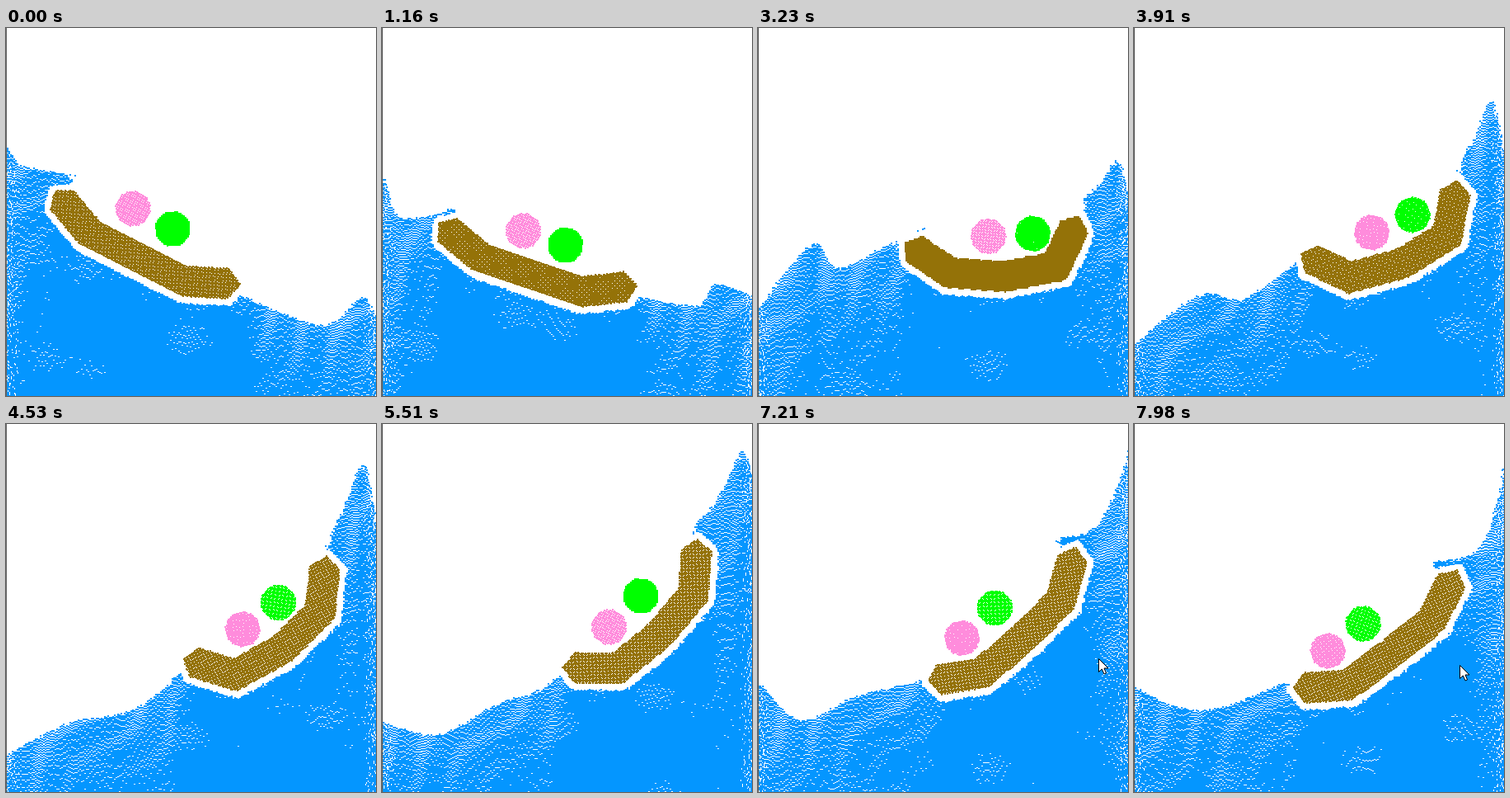
Write an HTML page with a canvas that moves like this. It is 449 px wide and 446 px high and loops after 8000 ms.

```html
<!DOCTYPE html>
<html lang="en">
<head>
<meta charset="utf-8">
<title>Boat in a wave tank</title>
<style>
  html, body { margin: 0; width: 100%; height: 100%; overflow: hidden; background: #fff; }
  canvas { display: block; }
</style>
</head>
<body>
<canvas id="stage" width="449" height="446"></canvas>
<script>
const W = 449, H = 446, LOOP = 8000, FIRST = 60, STEP = 81.65;
const ctx = document.getElementById('stage').getContext('2d');
const image = ctx.createImageData(W, H);
const pixels = new Uint32Array(image.data.buffer);
const maskCanvas = document.createElement('canvas');
maskCanvas.width = W;
maskCanvas.height = H;
const mask = maskCanvas.getContext('2d', { willReadFrequently: true });

const rgb = (r, g, b) => (0xff000000 | b << 16 | g << 8 | r) >>> 0;
const WATER = rgb(4, 150, 255), WOOD = rgb(148, 114, 8), PINK = rgb(255, 140, 220);
const GREEN = rgb(0, 255, 0), WALL = rgb(100, 100, 100), WHITE = rgb(255, 255, 255);

// boat: middle x, y, tilt, left bend, right bend (degrees)
// balls: position along the deck, height above the middle
// left: wall height, crest x, y, trough x, y, shoulder height against the bow
// right: lip offset x, y, slope x, y, crest x, y, wall height
const poses = [];
const pose = (time, boat, balls, left, right) => poses.push({ time, values: [...boat, ...balls, ...left, ...right] });

pose(0, [160, 278, 27, 23, 24], [-5, 50], [138, 8, 156, 17, 166, -27], [5, 16, 385, 360, 431, 326, 350]);
pose(1160, [182, 299, 18.7, 21, 25], [0, 47], [168, 8, 200, 19, 227, -6], [7, 15, 383, 336, 404, 310, 325]);
pose(2240, [225, 306, 10, 24, 26], [4, 43], [285, 15, 203, 52, 268, 2], [7, 4, 396, 277, 437, 280, 300]);
pose(3230, [300, 301, -4, 30, 54], [11, 50], [340, 66, 264, 98, 292, 4], [2, -19, 415, 186, 437, 157, 200]);
pose(4530, [336, 272, -37, 46, 39], [2, 48], [401, 78, 362, 145, 350, 35], [-3, -10, 410, 100, 434, 47, 120]);
pose(6430, [330, 248, -45.5, 32, 33], [-22, 51], [314, 55, 371, 128, 322, 9], [-20, -10, 405, 103, 440, 40, 30]);
pose(7980, [312, 278, -37.5, 32, 24], [-32, 49], [318, 50, 342, 105, 344, -3], [-36, -10, 415, 154, 440, 95, 30]);

function slope(k, n) {
  const a = poses[Math.max(0, k - 1)], b = poses[Math.min(poses.length - 1, k + 1)];
  return (b.values[n] - a.values[n]) / (b.time - a.time);
}

// Cubic Hermite blend between neighbouring poses.
function poseAt(time) {
  let k = 0;
  while (k < poses.length - 2 && time >= poses[k + 1].time) k++;
  const a = poses[k], b = poses[k + 1], span = b.time - a.time;
  const u = Math.min(1, (time - a.time) / span), v = 1 - u;
  return a.values.map((from, n) =>
    from * (1 + 2 * u) * v * v + b.values[n] * u * u * (3 - 2 * u) +
    span * u * v * (slope(k, n) * v - slope(k + 1, n) * u));
}

const hash = (a, b) => {
  const s = Math.sin(a * 12.9898 + b * 78.233) * 43758.5453;
  return s - Math.floor(s);
};
const move = ([x, y], angle, length) => [x + Math.cos(angle) * length, y + Math.sin(angle) * length];

// A flexible beam of four segments with pointed ends.
function bendBoat(x, y, tilt, leftBend, rightBend) {
  const rad = Math.PI / 180, half = 18.5, up = Math.PI / 2;
  const sag = 0.43 * Math.max(0, leftBend + rightBend - 48);
  const a1 = (tilt + sag / 2) * rad, a2 = (tilt - sag / 2) * rad;
  const a0 = a1 + leftBend * rad, a3 = a2 - rightBend * rad;
  const middle = [x, y], p1 = move(middle, a1, -66), p3 = move(middle, a2, 64);
  const spine = [move(p1, a0, -52), p1, middle, p3, move(p3, a3, 53)];
  const angles = [a0, a0, a1, a2, a3, a3];
  const side = way => spine.map((p, i) => {
    const before = angles[i], after = angles[i + 1];
    return move(p, (before + after) / 2 + up * way, half / Math.cos((after - before) / 2));
  });
  const bow = move(spine[0], a0, -14), stern = move(spine[4], a3, 15);
  const hull = new Path2D();
  [bow, ...side(-1), stern, ...side(1).reverse()].forEach(p => hull.lineTo(...p));
  hull.closePath();
  return { hull, spine, bow, stern, middle, tilt: tilt * rad };
}

// Adds a smooth curve through the points.
function curve(path, points) {
  path.lineTo(...points[0]);
  for (let i = 1; i < points.length; i++) {
    const p = points[i - 1], q = points[i];
    const before = points[i - 2] || p, after = points[i + 1] || q;
    path.bezierCurveTo(
      p[0] + (q[0] - before[0]) / 6, p[1] + (q[1] - before[1]) / 6,
      q[0] - (after[0] - p[0]) / 6, q[1] - (after[1] - p[1]) / 6, ...q);
  }
}

function plot(x, y, color) {
  x = Math.round(x);
  y = Math.round(y);
  for (let j = y; j < y + 2; j++)
    for (let i = x; i < x + 2; i++)
      if (i > 0 && i < W && j >= 0 && j < H) pixels[j * W + i] = color;
}

// Fills a shape with a turned lattice of 2px particles.
function lattice([cx, cy], reach, angle, gap, color, inside) {
  const c = Math.cos(angle) * gap, s = Math.sin(angle) * gap, n = Math.ceil(reach / gap);
  for (let i = -n; i <= n; i++) {
    for (let j = -n; j <= n; j++) {
      const x = cx + i * c - j * s, y = cy + i * s + j * c;
      if (inside(x, y)) plot(x - 1, y - 1, color);
    }
  }
}

function ball(boat, along, height, gap, color) {
  const center = move(move(boat.middle, boat.tilt, along), boat.tilt - Math.PI / 2, height);
  lattice(center, 22, boat.tilt + along / 21, gap, color,
    (x, y) => Math.hypot(x - center[0], y - center[1]) < 21.2);
}

function waterMask(boat, left, right) {
  const [bx, by] = boat.bow, [sx, sy] = boat.stern;
  const [leftWall, crestX, crestY, troughX, troughY, shoulder] = left;
  const [lipX, lipY, slopeX, slopeY, peakX, peakY, rightWall] = right;
  const path = new Path2D();
  curve(path, [[0, leftWall], [crestX, crestY], [troughX, troughY], [bx - 23, by + shoulder], [bx + 26, by - 20]]);
  boat.spine.forEach(p => path.lineTo(...p));
  curve(path, [[sx + lipX, sy + lipY], [slopeX, slopeY], [peakX, peakY], [W, rightWall]]);
  path.lineTo(W, H);
  path.lineTo(0, H);

  mask.globalCompositeOperation = 'source-over';
  mask.clearRect(0, 0, W, H);
  mask.fill(path);
  mask.globalCompositeOperation = 'destination-out';
  mask.lineWidth = 16;
  mask.lineJoin = 'round';
  mask.fill(boat.hull);
  mask.stroke(boat.hull);
  const data = mask.getImageData(0, 0, W, H).data;
  return (x, y) => {
    x = Math.min(W - 1, Math.max(0, Math.round(x)));
    y = Math.min(H - 1, Math.max(0, Math.round(y)));
    return data[(y * W + x) * 4 + 3] > 127;
  };
}

function smoothTops(inside) {
  const tops = Array.from({ length: W }, (_, x) => {
    let y = 0;
    while (y < H - 1 && !inside(x, y)) y++;
    return y;
  });
  return tops.map((_, x) => {
    const near = tops.slice(Math.max(0, x - 12), x + 13);
    return near.reduce((sum, y) => sum + y, 0) / near.length;
  });
}

// Rows of particles follow the surface; they spread where it is steep and stay packed under the boat.
function water(inside, boat, time) {
  const tops = smoothTops(inside);
  const drift = time / 1500;
  for (let x = 1, col = 0; x < W; col++, x += 2) {
    const at = Math.min(W - 1, x);
    const fall = (tops[Math.min(W - 1, at + 5)] - tops[Math.max(0, at - 5)]) / 10;
    const outside = Math.max(boat.bow[0] + 25 - x, x - boat.stern[0] + 15);
    const loose = Math.min(1, Math.max(0.15, outside / 40));
    const steep = loose * Math.min(1, Math.abs(fall) / 1.6);
    const wall = Math.exp(-Math.min(x, W - x) / 35);
    const reach = 14 + 30 * loose + 40 * steep + 60 * wall;
    let y = tops[at] - 120 + (col % 2);
    for (let row = 0; y < H; row++) {
      const depth = y - tops[at];
      const fuzz = hash(col, row) - 0.5;
      const spray = Math.min(0.85, -depth / 40);
      const px = x + fuzz * wall * 1.6;
      if (hash(row, col + 7) > spray && inside(px + fuzz * 2, y + fuzz * 2)) plot(px, y, WATER);
      const swirl = Math.max(0, Math.sin(x / 9 + y / 12 + 2 * Math.sin(y / 31 - x / 40 + drift)));
      const patch = Math.sin(x / 47 + drift) * Math.sin(y / 19 - x / 90 + drift) + 0.25 * Math.sin(x / 13 + y / 23);
      y += 1.96 + loose * (0.3 + 0.5 * steep + 0.8 * swirl) * Math.exp(-Math.max(0, depth) / reach) +
        0.4 * Math.max(0, patch - 0.5);
    }
  }
}

const arrow = new Path2D('M.5 .5V16.5L4.3 13L7 19L9.5 18L7 12H12Z');

function drawPointer(time) {
  const u = (time - 5600) / 2380;
  if (u < 0) return;
  ctx.save();
  ctx.translate(Math.round(449 - 54 * u), Math.round(266 + 26 * u));
  ctx.fillStyle = '#fff';
  ctx.strokeStyle = '#000';
  ctx.fill(arrow);
  ctx.stroke(arrow);
  ctx.restore();
}

function draw(time) {
  const values = poseAt(time);
  const take = count => values.splice(0, count);
  const boat = bendBoat(...take(5));
  const [along, height] = take(2);

  pixels.fill(WHITE);
  water(waterMask(boat, take(6), take(7)), boat, time);
  lattice(boat.middle, 160, boat.tilt, 1.86, WOOD, (x, y) => ctx.isPointInPath(boat.hull, x, y));
  ball(boat, along - 27, height, 1.96, PINK);
  ball(boat, along + 27, height, 1.8, GREEN);
  for (let y = 0; y < H; y++) pixels[y * W] = WALL;
  ctx.putImageData(image, 0, 0);
  drawPointer(time);
}

const start = performance.now();
let shown = -1;
function tick() {
  const time = (performance.now() - start) % LOOP;
  const step = Math.max(0, Math.floor((time - FIRST) / STEP) + 1);
  if (step !== shown) {
    shown = step;
    draw(step ? Math.min(7980, FIRST + (step - 0.5) * STEP) : 0);
  }
  requestAnimationFrame(tick);
}
tick();
</script>
</body>
</html>
```
